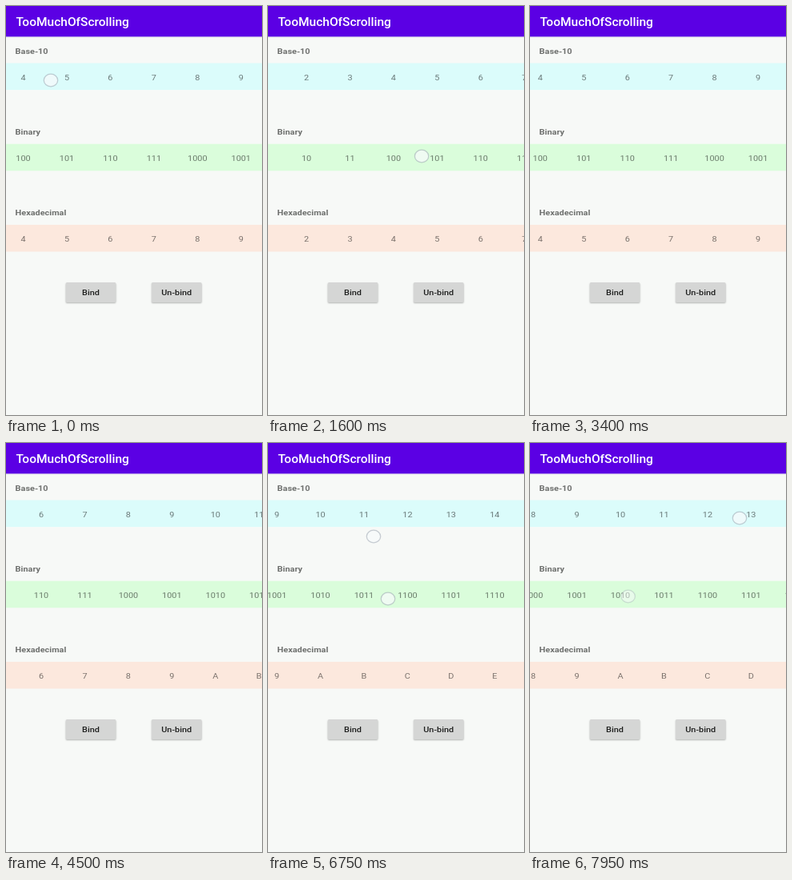
Recreate the animation shown at these times as an HTML page with a canvas. Size 320x512 px, loop 8000 ms.

```html
<!DOCTYPE html>
<html lang="en">
<head>
<meta charset="utf-8">
<title>TooMuchOfScrolling</title>
<style>
  html, body { margin: 0; width: 100%; height: 100%; overflow: hidden; background: #f7f9f7; }
  canvas { display: block; width: 320px; height: 512px; }
</style>
</head>
<body>
<canvas></canvas>
<script>
const WIDTH = 320, HEIGHT = 512, LOOP = 8000, STEP = 50;
const PIXEL_ASPECT = 0.89;
const PITCH = 54.45;         // distance between neighbouring numbers
const FADE = 150;

const canvas = document.querySelector('canvas');
const ratio = window.devicePixelRatio || 1;
canvas.width = WIDTH * ratio;
canvas.height = HEIGHT * ratio;
const ctx = canvas.getContext('2d');
ctx.scale(ratio, ratio);

const rows = [
  { label: 'Base-10', radix: 10, top: 71.5, color: '#dbfcfb' },
  { label: 'Binary', radix: 2, top: 172.7, color: '#dafddb' },
  { label: 'Hexadecimal', radix: 16, top: 273.9, color: '#fce8dd' }
];

// [time, scroll offset]: drags, flings and rests shared by all rows
const scrollKeys = [
  [0, 196.3], [250, 136], [450, 104], [600, 100], [850, 100],
  [1250, 32], [1600, 60.9], [1900, 175], [2200, 239], [2500, 259.5], [2550, 261.7], [2750, 264],
  [3000, 264], [3400, 205], [4150, 205],
  [4350, 248], [4500, 282.7], [4700, 333], [4950, 365], [5250, 371], [5500, 371],
  [5700, 428], [5850, 475], [6050, 521], [6250, 538],
  [6750, 479], [7100, 515], [7400, 521], [7850, 436], [7950, 431.5], [8000, 432.5]
];

// A finger holds one content position (grip), so it moves with the scroll.
const touches = [
  { from: -100, to: 250, grip: 252.3, y: 93 },
  { from: 850, to: 1900, grip: 253, y: 188 },
  { from: 3000, to: 3250, grip: 420, y: 89 },
  { from: 4150, to: 4325, grip: 420, y: 190 },
  { from: 5500, to: 5850, grip: 625, y: 93 },
  { from: 6300, to: 6750, grip: 611, y: 93, endY: 117 },
  { from: 6700, to: 7100, grip: 629, y: 195 },
  { from: 7450, to: 7900, grip: 555.5, y: 192 },
  { from: 7900, to: 8100, grip: 693.5, y: 94 }
];

const slopes = scrollKeys.slice(1).map(([t, s], i) => (s - scrollKeys[i][1]) / (t - scrollKeys[i][0]));

// Harmonic mean of the neighbouring slopes: smooth and without overshoot
function tangent(i) {
  const a = slopes[i - 1] ?? slopes[i], b = slopes[i] ?? a;
  return a * b > 0 ? 2 * a * b / (a + b) : 0;
}

function scrollAt(time) {
  const i = scrollKeys.findIndex(([t]) => t > time) - 1;
  const [t0, s0] = scrollKeys[i], [t1, s1] = scrollKeys[i + 1];
  const span = t1 - t0, u = (time - t0) / span, v = 1 - u;
  return s0 * (1 + 2 * u) * v * v + s1 * u * u * (3 - 2 * u)
    + span * u * v * (tangent(i) * v - tangent(i + 1) * u);
}

function rect(x, y, w, h, color) {
  ctx.fillStyle = color;
  ctx.fillRect(x, y, w, h);
}

function text(string, x, baseline, size, weight, color, align = 'left') {
  ctx.save();
  ctx.translate(x, baseline);
  ctx.scale(1, PIXEL_ASPECT);
  ctx.font = `${weight} ${size}px Roboto, sans-serif`;
  ctx.textAlign = align;
  ctx.fillStyle = color;
  ctx.fillText(string, 0, 0);
  ctx.restore();
}

function drawToolbar() {
  rect(0, 38, WIDTH, 1, '#d9d3ea');
  rect(0, 39, WIDTH, 1, '#eff0f1');
  rect(0, 0, WIDTH, 38.3, '#5b00e4');
  text('TooMuchOfScrolling', 12.5, 24.7, 15.5, 500, '#fff');
}

function drawRow({ label, radix, top, color }, scroll) {
  text(label, 11.6, top - 12, 10.9, 700, '#6e706e');
  rect(0, top, WIDTH, 33.6, color);
  const first = Math.max(1, Math.floor(scroll / PITCH));
  for (let n = first; n * PITCH - scroll < WIDTH + 20; n++) {
    const name = n.toString(radix).toUpperCase();
    text(name, n * PITCH - scroll, top + 21.3, 10.9, 400, 'rgba(0,0,0,.52)', 'center');
  }
}

function drawButton(label, x) {
  ctx.save();
  ctx.shadowColor = 'rgba(0,0,0,.28)';
  ctx.shadowBlur = 2 * ratio;
  ctx.shadowOffsetY = ratio;
  ctx.fillStyle = '#d5d6d5';
  ctx.beginPath();
  ctx.roundRect(x, 346, 62.5, 25, 1.5);
  ctx.fill();
  ctx.restore();
  text(label, x + 31.2, 361.8, 10.9, 500, '#1d1e1d', 'center');
}

function drawTouch({ from, to, grip, y, endY = y }, time, scroll) {
  if (time < from || time >= to + FADE) return;
  const progress = Math.min(1, (time - from) / (to - from));
  const x = grip - (time > to ? scrollAt(to) : scroll);
  ctx.save();
  ctx.globalAlpha = Math.min(1, 1 - (time - to) / FADE);
  ctx.beginPath();
  ctx.ellipse(x, y + (endY - y) * progress ** 2, 8.7, 7.8, 0, 0, 2 * Math.PI);
  ctx.fillStyle = 'rgba(246,249,251,.72)';
  ctx.fill();
  ctx.lineWidth = 1.3;
  ctx.strokeStyle = 'rgba(150,160,172,.5)';
  ctx.stroke();
  ctx.restore();
}

function draw(now) {
  const time = Math.floor(now % LOOP / STEP) * STEP;
  const scroll = scrollAt(time);
  rect(0, 0, WIDTH, HEIGHT, '#f7f9f7');
  drawToolbar();
  rows.forEach(row => drawRow(row, scroll));
  drawButton('Bind', 74.8);
  drawButton('Un-bind', 182);
  touches.forEach(touch => drawTouch(touch, time, scroll));
}

const start = performance.now();
function tick() {
  draw(performance.now() - start);
  requestAnimationFrame(tick);
}
tick();
</script>
</body>
</html>
```
